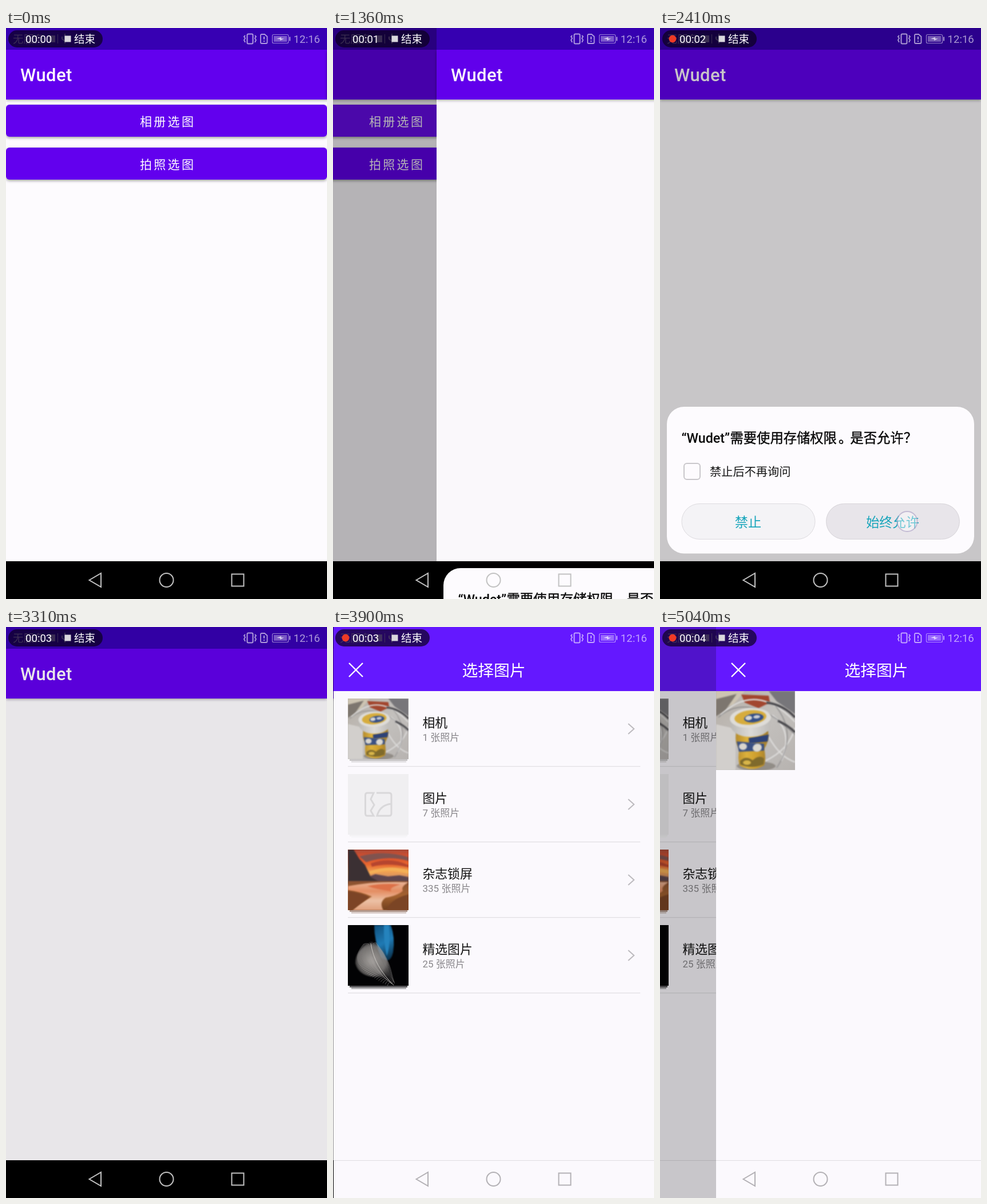
Recreate the animation shown at these times as an HTML page with a canvas. Size 561 by 998 pixels, loop 5.09 s.

```html
<!DOCTYPE html>
<html lang="zh-CN">
<head>
<meta charset="utf-8">
<style>
html, body { margin: 0; width: 100%; height: 100%; overflow: hidden; background: #000; }
canvas { display: block; width: 561px; height: 998px; }
</style>
</head>
<body>
<canvas id="stage" width="561" height="998"></canvas>
<script>
const ctx = document.getElementById('stage').getContext('2d');
const W = 561, H = 998, NAV = 932, LOOP = 5090;
const FONT = 'Roboto, "Noto Sans CJK SC", "Noto Sans CJK", sans-serif';
const NAME = 'Wudet';
const PAGE = '#fdfbfe', PURPLE = '#6200ee', VIOLET = '#6418ff';
const TICKS = [980, 1860, 2950, 4000];
const DOT_ON = [[500, 980], [1545, 1860], [2360, 2950], [3450, 4000], [4500, LOOP]];

const clamp = v => Math.max(0, Math.min(1, v));
const ramp = (t, start, span) => clamp((t - start) / span);
const slideEase = u => 1 - Math.pow(1 - u, 4.75);

// The picture advances 22 times a second.
const stepTime = k => Math.floor(k * 100 / 22) * 10;
function snap(t) {
  const k = Math.floor(t * 0.022) + 1;
  return stepTime(stepTime(k) > t ? k - 1 : k);
}

function rect(x, y, w, h, color) {
  ctx.fillStyle = color;
  ctx.fillRect(x, y, w, h);
}

function round(x, y, w, h, r, fill, stroke, lw = 1) {
  ctx.beginPath();
  ctx.roundRect(x, y, w, h, r);
  if (fill) { ctx.fillStyle = fill; ctx.fill(); }
  if (stroke) { ctx.strokeStyle = stroke; ctx.lineWidth = lw; ctx.stroke(); }
}

function oval(x, y, rx, ry, fill, angle = 0) {
  ctx.beginPath();
  ctx.ellipse(x, y, rx, ry, angle, 0, Math.PI * 2);
  ctx.fillStyle = fill;
  ctx.fill();
}

function ring(x, y, r, color, lw) {
  ctx.beginPath();
  ctx.arc(x, y, r, 0, Math.PI * 2);
  ctx.strokeStyle = color;
  ctx.lineWidth = lw;
  ctx.stroke();
}

function line(color, lw, ...p) {
  ctx.beginPath();
  for (let i = 0; i < p.length; i += 2) ctx.lineTo(p[i], p[i + 1]);
  ctx.strokeStyle = color;
  ctx.lineWidth = lw;
  ctx.stroke();
}

function shape(d, fill, stroke, lw = 1) {
  const path = new Path2D(d);
  if (fill) { ctx.fillStyle = fill; ctx.fill(path); }
  if (stroke) { ctx.strokeStyle = stroke; ctx.lineWidth = lw; ctx.stroke(path); }
}

function blend(x0, y0, x1, y1, ...colors) {
  const g = ctx.createLinearGradient(x0, y0, x1, y1);
  colors.forEach((c, i) => g.addColorStop(i / (colors.length - 1), c));
  return g;
}

function text(s, x, y, size, color, { weight = 400, align = 'left', gap = 0, thick = 0 } = {}) {
  ctx.font = `${weight} ${size}px ${FONT}`;
  ctx.letterSpacing = gap + 'px';
  ctx.textAlign = align;
  ctx.fillStyle = color;
  ctx.fillText(s, x, y);
  if (thick) {
    ctx.strokeStyle = color;
    ctx.lineWidth = thick;
    ctx.strokeText(s, x, y);
  }
  ctx.letterSpacing = '0px';
}

function group(x, y, draw, scale = 1) {
  ctx.save();
  ctx.translate(x, y);
  ctx.scale(scale, scale);
  draw();
  ctx.restore();
}

function shadow(blur, dy, alpha, draw) {
  ctx.save();
  ctx.shadowColor = `rgba(0,0,0,${alpha})`;
  ctx.shadowBlur = blur;
  ctx.shadowOffsetY = dy;
  draw();
  ctx.restore();
}

function appPage() {
  rect(0, 0, W, NAV, PAGE);
  shadow(5, 1.5, 0.35, () => rect(0, 38, W, 87, PURPLE));
  rect(0, 0, W, 38, '#3700b3');
  text(NAME, 25, 93, 31, '#fdf9ff', { weight: 500, gap: 0.4 });
}

function ripple(t) {
  const fade = 1 - ramp(t, 1180, 200);
  if (t < 930 || !fade) return;
  const u = ramp(t, 930, 305);
  ctx.save();
  ctx.beginPath();
  ctx.roundRect(0, 134, W, 56, 6);
  ctx.clip();
  rect(0, 134, W, 56, `rgba(255,255,255,${0.22 * fade})`);
  oval(409 - 130 * u, 162, 5 + 290 * u, 5 + 290 * u, `rgba(255,255,255,${0.19 * fade})`);
  ctx.restore();
  if (t < 1060) {
    oval(409, 162, 15, 15, 'rgba(255,255,255,.05)');
    ring(409, 162, 15.5, 'rgba(190,150,250,.35)', 1.5);
  }
}

function homePage(t) {
  appPage();
  [['相册选图', 134], ['拍照选图', 209]].forEach(([label, y], i) => {
    shadow(5, 2, 0.38, () => round(0, y, W, 56, 6, PURPLE));
    if (i === 0) ripple(t);
    text(label, 234, y + 37, 21, '#fff', { weight: 500, gap: 3.3 });
  });
}

function dialog(t) {
  const teal = '#17a5bb', ink = '#0a0a0a', heavy = { weight: 500, thick: 0.45 };
  round(12, 662, 537, 256.5, 30, '#fdfbfe');
  text(`“${NAME}”`, 37.5, 725, 23.3, ink, { weight: 500 });
  text('需要使用存储权限', 122.5, 725, 23.3, ink, heavy);
  text('。', 312, 725, 23.3, ink, heavy);
  text('是否允许？', 332.5, 725, 23.3, ink, heavy);
  round(42, 761, 28, 28, 5, null, '#c9c7cb', 2);
  text('禁止后不再询问', 87, 783, 20.2, '#151515');
  const press = ramp(t, 2320, 60) * (1 - ramp(t, 2560, 160));
  [['禁止', 38], ['始终允许', 290.5]].forEach(([label, x], i) => {
    round(x, 831.5, 233, 62, 31, '#f4f3f6', '#dddbdf', 1);
    if (i) round(x, 831.5, 233, 62, 31, `rgba(80,50,80,${0.07 * press})`);
    text(label, x + 116, 872, 23.2, teal, { align: 'center' });
  });
  if (t >= 2320 && t < 2540) {
    oval(432, 862.5, 17, 17, 'rgba(255,255,255,.4)');
    ring(432, 862.5, 17.5, 'rgba(175,165,200,.65)', 2);
  }
}

// Jar among cables, 138 units square.
function jarPhoto() {
  ctx.beginPath();
  ctx.rect(0, 0, 138, 138);
  ctx.clip();
  rect(0, 0, 138, 138, blend(0, 0, 138, 138, '#b5aea6', '#c3c0bd', '#b7b3b0'));
  ctx.filter = 'blur(0.8px)';
  shape('M0 58L34 66V138H0Z', '#d2cfcc');
  shape('M0 0H50L30 24L0 32Z', '#cdc4b2');
  shape('M0 14L36 5L16 34L0 44Z', '#7d766f');
  shape('M44 6L92 8L94 20L74 30L50 20Z', '#a2462f');
  shape('M92 0H138V40L106 18Z', '#77767a');
  shape('M8 42Q70 -18 138 54M98 42Q136 70 114 122M86 122Q128 102 138 64M92 80Q112 116 138 124',
    null, '#dcdbda', 2.5);
  shape('M4 46Q58 -2 138 76M104 26Q144 76 106 134', null, '#8a898a', 1.3);
  shape('M108 52Q126 60 138 72M88 20Q118 24 138 46', null, '#4b4a4e', 4);
  oval(70, 131, 34, 8, 'rgba(70,60,50,.35)');
  const body = blend(34, 0, 92, 0, '#b58b2c', '#dcb13c', '#cc9c2c', '#9d7a2f');
  shape('M36 70Q31 88 41 101Q37 117 41 130Q62 142 84 130Q88 116 84 101Q93 88 91 70Z', body);
  shape('M57 82L92 76L90 88L58 92Z', '#2d4278');
  shape('M36 88L84 92L84 104L40 106Z', '#3b5183');
  oval(47, 97, 7, 6, '#d9d6ce');
  oval(72, 99, 8, 7, '#dcd9d1', -0.3);
  shape('M42 122Q52 112 64 121Q76 110 84 118L83 128Q62 137 42 128Z', '#7f6a2c');
  oval(54, 125, 7, 4, '#d8b54a');
  shape('M24 48L27 66Q36 80 60 80Q88 79 93 64L96 46Z', blend(24, 0, 96, 0, '#b9b7b4', '#dcdad7', '#bcbab7'));
  oval(60, 47, 36, 17.5, '#dedcd8', -0.05);
  oval(60, 46, 28, 12.5, '#d6ac3d', -0.1);
  oval(66, 47, 17, 7.5, '#334e88', -0.12);
  oval(57, 47, 6, 4, '#d7d6d2', -0.12);
  oval(71, 45, 6, 3, '#c9cbd2', -0.12);
}

function sunsetPhoto() {
  ctx.beginPath();
  ctx.rect(0, 0, 106, 106);
  ctx.clip();
  rect(0, 0, 106, 106, blend(0, 0, 0, 52, '#a84a38', '#d9502e', '#e8672f', '#efa052', '#c98a68'));
  ctx.filter = 'blur(1.2px)';
  shape('M20 12Q62 0 106 13V20Q70 9 32 22Z', '#80534f');
  shape('M40 24Q74 12 106 27V31Q70 22 42 30Z', '#b5452f');
  shape('M38 38Q72 26 106 36V42Q70 33 38 43Z', '#f3b057');
  shape('M30 50L48 43L70 47L90 45L106 48V62H30Z', '#5d454d');
  shape('M0 0H10L20 16L30 27L40 48L54 56L0 60Z', '#3b3033');
  rect(0, 55, 106, 51, blend(0, 55, 0, 106, '#8a5132', '#a4622f', '#71401f'));
  shape('M0 64Q42 55 106 57Q92 65 96 72Q88 80 66 84Q54 92 62 106H8Q24 92 42 82Q24 74 0 71Z',
    blend(0, 56, 0, 106, '#e8b597', '#e48d62', '#ecc2a6', '#e0a07c'));
  shape('M34 64Q60 58 92 61Q70 67 76 73Q52 70 34 64Z', '#dd7148');
  shape('M0 72Q26 76 38 83L6 106H0Z', '#7c4426');
  shape('M68 106Q72 88 106 78V106Z', '#7b4525');
}

function featherPhoto() {
  ctx.beginPath();
  ctx.rect(0, 0, 106, 106);
  ctx.clip();
  rect(0, 0, 106, 106, '#020204');
  ctx.filter = 'blur(1px)';
  shape('M46 0Q46 28 58 56Q74 70 79 48Q83 22 75 0Z', blend(46, 0, 82, 60, '#0f4f7c', '#1f7ab4', '#08263c'));
  shape('M63 0Q62 28 68 54Q75 34 72 0Z', '#2583bd');
  const glow = ctx.createRadialGradient(42, 62, 4, 42, 62, 36);
  glow.addColorStop(0, 'rgba(165,161,158,.85)');
  glow.addColorStop(0.65, 'rgba(125,122,120,.75)');
  glow.addColorStop(1, 'rgba(70,68,68,.25)');
  shape('M41 29Q12 44 13 67Q18 86 40 90Q60 92 72 88Q74 70 66 56Q58 36 41 29Z', glow);
  ctx.filter = 'none';
  // Barbs sweep away from a curved shaft.
  for (let i = 0; i < 34; i++) {
    const u = i / 33, x = 40 + 36 * u * u, y = 32 + 66 * u;
    const reach = 7 + 22 * Math.sin(Math.PI * Math.min(1, u * 0.9 + 0.1));
    ctx.beginPath();
    ctx.moveTo(x - reach, y + 2 + 6 * u);
    ctx.quadraticCurveTo(x - reach * 0.4, y - 3, x, y + 5);
    ctx.quadraticCurveTo(x + reach * 0.5, y - 4, x + reach * 0.8, y + 4 * u);
    ctx.strokeStyle = 'rgba(215,211,207,.5)';
    ctx.lineWidth = 0.8;
    ctx.stroke();
  }
  shape('M40 32Q46 72 80 105', null, '#c9c6c2', 1);
}

function placeholder() {
  const c = '#d9d8da';
  rect(0, 0, 106, 106, '#f0eff1');
  shape('M45 33H34Q30.500 33 30.500 37V69Q30.500 73 34 73H45L40 64L46 54L40 44Z', null, c, 3);
  shape('M50 33H72Q76 33 76 37V69Q76 73 72 73H51Q56 54 76 52', null, c, 3);
}

const ALBUMS = [
  ['相机', 1, () => group(0, 0, jarPhoto, 106 / 138), '#c8c6c7'],
  ['图片', 7, placeholder, '#f4f3f5'],
  ['杂志锁屏', 335, sunsetPhoto, '#b29a8f'],
  ['精选图片', 25, featherPhoto, '#5a595c']
];

function pickerPage() {
  rect(0, 0, W, H, '#fbf9fd');
  rect(0, 0, W, 112, VIOLET);
  line('#fff', 2.4, 27, 63, 51, 87);
  line('#fff', 2.4, 51, 63, 27, 87);
  text('选择图片', 280, 86, 27.8, '#fff', { align: 'center', weight: 500 });
  rect(0, NAV, W, 1, '#dfdde1');
}

function albumPage() {
  pickerPage();
  ALBUMS.forEach(([title, count, draw, edge], i) => {
    const y = 112 + i * 132;
    ctx.globalAlpha = 0.45;
    rect(31, y + 122, 96, 3, edge);
    ctx.globalAlpha = 1;
    rect(28, y + 119, 101, 3, edge);
    group(25, y + 13, draw);
    text(title, 155.5, y + 63, 21.8, '#111');
    text(`${count} 张照片`, 155.5, y + 87, 17, '#88868a');
    line('#bcbabe', 2, 515, y + 57, 525, y + 66, 515, y + 75);
    rect(25, y + 131, 511, 1.3, '#e2e0e4');
  });
}

function photoPage() {
  pickerPage();
  group(0, 112, jarPhoto);
}

// New page enters from the right while the old one drifts left and darkens.
function slide(p, oldPage, newPage, drift, dim) {
  if (p < 1) {
    group(-Math.round(W * drift * p), 0, oldPage);
    rect(0, 0, W, H, `rgba(0,0,0,${dim * p})`);
  }
  group(Math.round(W * (1 - p)), 0, newPage);
}

function permission(t, x) {
  const shown = ramp(t, 1340, 355), gone = ramp(t, 3150, 262);
  if (!shown || gone === 1) return;
  rect(0, 0, W, NAV, `rgba(0,0,0,${0.21 * shown * (1 - gone)})`);
  const drop = 336 * (Math.pow(1 - shown, 3) + Math.pow(ramp(t, 3110, 180), 2));
  if (drop < 336) group(Math.round(x), Math.round(drop), () => dialog(t));
}

function statusBar(t) {
  const tone = 'rgba(255,255,255,.6)';
  text('无服务', 12, 26, 18.5, tone);
  rect(75, 13, 11, 12, tone);
  rect(90, 11, 1, 16, tone);
  line(tone, 2, 103, 10, 103, 27);
  line(tone, 2, 98, 15, 98, 19, 103, 23, 108, 19, 108, 15);
  round(4, 4, 165, 30, 15, 'rgba(10,0,28,.7)');
  if (DOT_ON.some(([a, b]) => t >= a && t < b)) oval(22, 19, 6.5, 6.5, '#ee3a26');
  const seconds = TICKS.filter(s => t >= s).length;
  text('00:0' + seconds, 34, 26, 18.6, '#fff');
  rect(102.5, 13.5, 11, 11, '#dad8dd');
  text('结束', 119, 26, 18.5, '#fff');

  round(421.5, 10.5, 10, 17, 2, null, tone, 2);
  line(tone, 1.8, 418, 13, 416, 15, 418, 18, 416, 21, 418, 25);
  line(tone, 1.8, 435, 13, 437, 15, 435, 18, 437, 21, 435, 25);
  shape('M445 13Q445 11 447 11H452L456.500 15V25Q456.500 27 454.500 27H447Q445 27 445 25Z', null, tone, 1.8);
  rect(450, 15, 2, 5, tone);
  rect(450, 22, 2, 2, tone);
  round(465.5, 11.5, 28, 15, 2, null, 'rgba(255,255,255,.5)', 1.2);
  rect(468, 14, 23, 10, 'rgba(255,255,255,.35)');
  rect(495, 15.5, 2, 7, tone);
  shape('M473 19L481 16V18.500H486L479 22V19.500Z', 'rgba(255,255,255,.7)');
  text('12:16', 502.5, 26, 18.6, tone);
}

function navIcons(light) {
  const c = light ? '#b3b1b5' : '#c2c2c2';
  shape('M145.500 965L166 953V977Z', null, c, 2);
  ring(280.5, 965, 12, c, 2);
  ctx.lineWidth = 2;
  ctx.strokeRect(394.5, 954.5, 21, 21);
}

function render(time) {
  const t = snap(time);
  const ask = slideEase(ramp(t, 1250, 520));
  const pick = slideEase(ramp(t, 3515, 520));
  const open = slideEase(ramp(t, 4880, 520));
  rect(0, 0, W, H, '#000');
  if (t < 3515) {
    slide(ask, () => homePage(t), appPage, 0.45, 0.41);
    permission(t, W * (1 - ask));
  } else if (t < 4880) {
    slide(pick, appPage, albumPage, 0.45, 0.41);
  } else {
    slide(open, albumPage, photoPage, 0.25, 0.245);
  }
  navIcons(pick > 0.5);
  statusBar(t);
}

const start = performance.now();
function loop() {
  render((performance.now() - start) % LOOP);
  requestAnimationFrame(loop);
}
loop();
</script>
</body>
</html>
```
